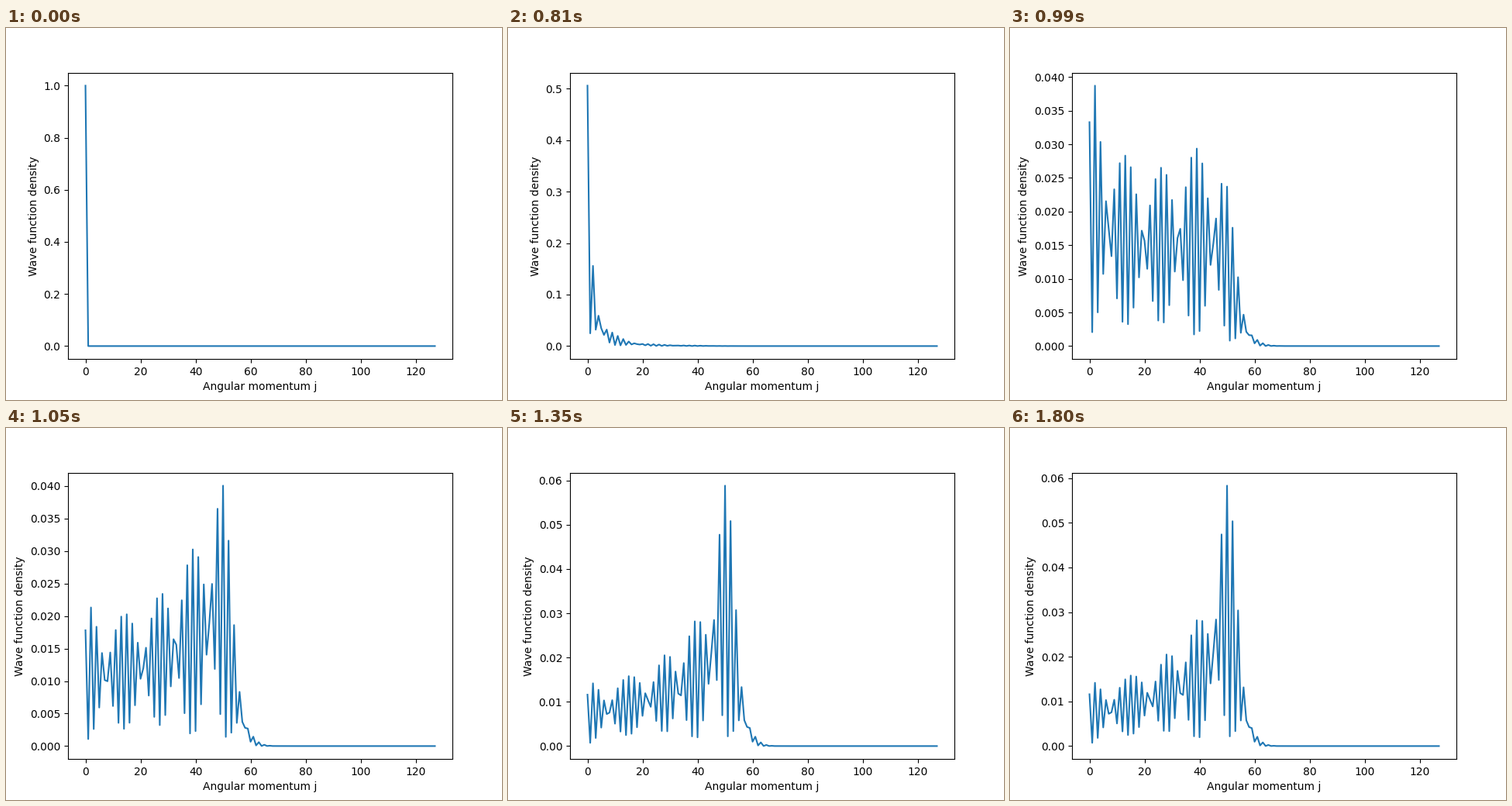
A matplotlib script for the animation above (1830 ms loop, 640x480 px).

```python
import numpy as np
import matplotlib.pyplot as plt
from matplotlib.animation import FuncAnimation

STEP_MS = 30
STEPS = 61
ARRIVAL = 27   # step at which half of the ground state has left
SETTLED = 39   # step at which the spreading ends
J = np.arange(128)


def bell(center, width):
    return np.exp(-((J - center) / width) ** 2)


def level(step, left, grown):
    """Density averaged over neighbouring even and odd j."""
    plateau = .0075 + 6e-5 * J + 3.3e-6 * J ** 2
    edge = 1 / (1 + np.exp((J - 47.5 - 5.5 * grown) / (3.5 - 1.9 * grown)))
    # Before settling, low j is overfull and high j is not yet reached.
    steep = 1.2 * left ** 2.6
    tilt = np.exp(steep * (8 * np.exp(-.83 * left ** 2) - np.sqrt(J)))
    rainbow = bell(50, np.where(J < 50, 4.3, 6.8))
    height = (.01586 - 1.8e-5 * step) * grown ** 2
    return plateau * edge * tilt + height * rainbow


def ripple(grown):
    """Even-odd alternation whose sign slowly beats along j."""
    turns = (J - .5) / 6.35 + (.32 - .71 * grown) * bell(10 + 12 * grown, 13)
    contrast = .93 - (.1 + .15 * grown) * bell(21, 13)
    return 1 + contrast * np.cos(np.pi * (J + turns / 2))


def density(step):
    left = max(SETTLED - step, 0) / (SETTLED - ARRIVAL)
    t = 1 - min(left, 1)
    grown = t * t * (3 - 2 * t)
    d = level(step, left, grown) * ripple(grown)
    d[0] = .0116 + .9884 / (1 + np.exp((step - ARRIVAL) / 1.58))
    return d


fig, ax = plt.subplots(figsize=(6.4, 4.8), dpi=100)
line, = ax.plot(J, density(0))
ax.set_xlabel("Angular momentum j")
ax.set_ylabel("Wave function density")


def update(step):
    line.set_ydata(density(step))
    ax.relim()
    ax.autoscale_view()
    return line,


anim = FuncAnimation(fig, update, frames=STEPS, interval=STEP_MS,
                     init_func=lambda: update(0), repeat=True, repeat_delay=0)
plt.show()
```
